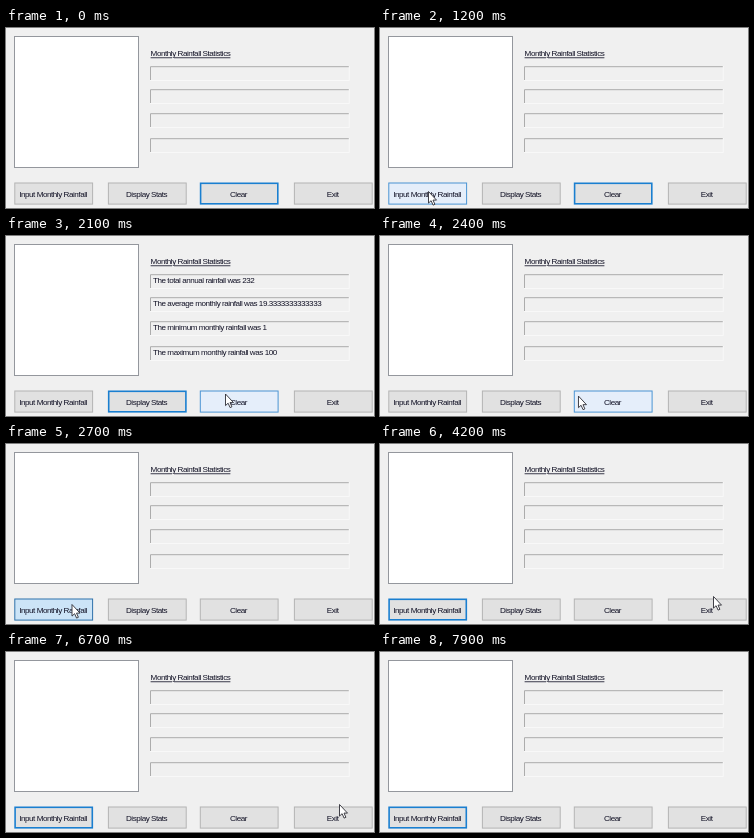
An HTML page that plays this animation: 368 px wide and 180 px high, repeating every 8000 ms.

```html
<!DOCTYPE html>
<html lang="en">
<head>
<meta charset="utf-8">
<title>Monthly Rainfall</title>
<style>
html, body { margin: 0; width: 368px; height: 180px; overflow: hidden; background: #f0f0f0; }
svg { display: block; }
text { font: 8.1px "Liberation Sans", Arial, sans-serif; letter-spacing: -0.46px; fill: #101024; white-space: pre; }
</style>
</head>
<body>
<svg id="stage" width="368" height="180" viewBox="0 0 368 180"></svg>
<script>
const stage = document.getElementById('stage');
const LOOP = 8000, STEP = 100;

function add(tag, attrs, content) {
  const el = document.createElementNS('http://www.w3.org/2000/svg', tag);
  for (const key in attrs) el.setAttribute(key, attrs[key]);
  if (content) el.textContent = content;
  stage.append(el);
  return el;
}

add('rect', { width: 368, height: 180, fill: '#f0f0f0' });
add('rect', { x: 8.5, y: 8.5, width: 124, height: 131, fill: '#fff', stroke: '#94979d' });
add('text', { x: 144.6, y: 28.4, 'text-decoration': 'underline' }, 'Monthly Rainfall Statistics');

const results = [
  [38, 'The total annual rainfall was 232'],
  [61, 'The average monthly rainfall was 19.3333333333333'],
  [85, 'The minimum monthly rainfall was 1'],
  [110, 'The maximum monthly rainfall was 100']
].map(([y, label]) => {
  add('path', { d: `M144.5 ${y + 15}V${y + .7}H343`, fill: 'none', stroke: '#acacac' });
  add('path', { d: `M144 ${y + 14.5}H343.3V${y}`, fill: 'none', stroke: '#f8f8f8' });
  return add('text', { x: 147, y: y + 8.5 }, label);
});

const buttons = [
  ['Input Monthly Rainfall', 8.3],
  ['Display Stats', 101.9],
  ['Clear', 193.8],
  ['Exit', 287.9]
].map(([label, x]) => {
  const box = add('rect', {});
  add('text', { x: x + 38.7, y: 168.9, 'text-anchor': 'middle' }, label);
  return { x, box };
});
const [INPUT, DISPLAY, CLEAR] = [0, 1, 2];
const BUTTON = { y: 154.5, width: 78.8, height: 22.1 };

const cursor = add('path', {
  d: 'M0 0V11.6L2.6 9.2 4.6 13.6 6.4 12.8 4.5 8.6H8Z',
  fill: '#fff', stroke: '#2c2c34', 'stroke-width': .9
});

// time, x, y of the pointer tip
const route = [
  [900, 62, 178], [1200, 48.5, 163.5], [1500, 148, 163], [1700, 152, 162],
  [1800, 152, 162], [2100, 219.5, 158], [2300, 223, 160], [2700, 66, 160.5]
];
const blinks = [
  [3500, 3900], [4200, 4700], [5000, 5500],
  [5800, 6300], [6500, 7000], [7300, 7700]
];

const within = (t, from, to) => t >= from && t < to;

function pointerAt(t) {
  if (within(t, 900, 2900)) {
    const next = route.findIndex(key => key[0] > t);
    if (next < 0) return route[route.length - 1].slice(1);
    const [t0, x0, y0] = route[next - 1], [t1, x1, y1] = route[next];
    const u = (t - t0) / (t1 - t0), ease = u * u * (3 - 2 * u);
    return [x0 + (x1 - x0) * ease, y0 + (y1 - y0) * ease];
  }
  return blinks.some(([on, off]) => within(t, on, off)) ? [333.5, 152.5] : null;
}

function buttonStyle(focused, hovered, pressed) {
  if (pressed) return ['#cce4f7', '#2f72ab', 1];
  if (hovered) return ['#e5eefa', '#4a94d4', 1];
  return focused ? ['#e1e1e1', '#1a7fd0', 1.6] : ['#e1e1e1', '#b4b4b4', 1];
}

function render(time) {
  const t = Math.floor(time % LOOP / STEP) * STEP;
  const tip = pointerAt(t);
  const focus = within(t, 1500, 2300) ? DISPLAY : t < 2600 ? CLEAR : INPUT;
  const pressed = t === 1500 ? DISPLAY : t === 2300 ? CLEAR : t === 2700 ? INPUT : -1;

  buttons.forEach(({ x, box }, i) => {
    const hovered = tip && t < 2900 && within(tip[0], x, x + BUTTON.width)
      && within(tip[1], BUTTON.y, BUTTON.y + BUTTON.height);
    const [fill, stroke, line] = buttonStyle(focus === i, hovered, pressed === i);
    const attrs = {
      x: x + line / 2, y: BUTTON.y + line / 2,
      width: BUTTON.width - line, height: BUTTON.height - line,
      fill, stroke, 'stroke-width': line
    };
    for (const key in attrs) box.setAttribute(key, attrs[key]);
  });

  const filled = within(t, 1600, 2400);
  results.forEach(line => line.setAttribute('visibility', filled ? 'visible' : 'hidden'));
  cursor.setAttribute('visibility', tip ? 'visible' : 'hidden');
  if (tip) cursor.setAttribute('transform', `translate(${tip[0]} ${tip[1]})`);
}

const start = performance.now();
function tick() {
  render(performance.now() - start);
  requestAnimationFrame(tick);
}
tick();
</script>
</body>
</html>
```
